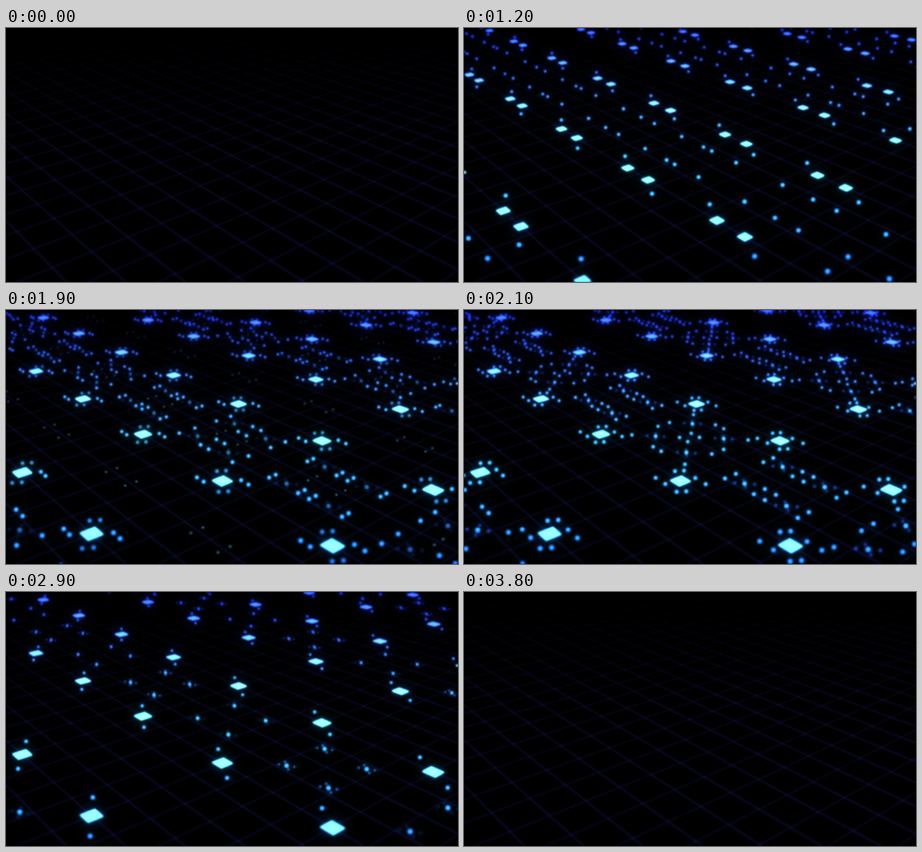
Write an HTML page with a canvas that moves like this. It is 690 by 388 pixels and loops after 5 s.

```html
<!DOCTYPE html>
<html lang="en">
<head>
<meta charset="utf-8">
<title>Perspective grid</title>
<style>
  html, body { margin: 0; width: 100%; height: 100%; overflow: hidden; background: #000; }
  canvas { display: block; width: 690px; height: 388px; }
</style>
</head>
<body>
<canvas id="stage" width="690" height="388"></canvas>
<script>
const W = 690, H = 388, LOOP = 5000, STEP = 100, STRIP = 24;
const ctx = document.getElementById('stage').getContext('2d');

function makeLayer() {
  const c = document.createElement('canvas');
  c.width = W;
  c.height = H;
  return c.getContext('2d');
}
const layer = makeLayer(), floor = makeLayer();

// Halo colour changes with distance: blue far away, teal in the middle.
const haze = layer.createLinearGradient(0, 0, 0, H);
haze.addColorStop(0, 'rgb(20,40,245)');
haze.addColorStop(0.2, 'rgb(15,75,245)');
haze.addColorStop(0.5, 'rgb(5,145,195)');
haze.addColorStop(1, 'rgb(10,110,235)');

const clamp = v => Math.max(0, Math.min(1, v));
const mix = (a, b, k) => a + (b - a) * k;

// Floor plane to screen; one unit is four grid cells.
function project(i, j) {
  const d = 1 - 0.139 * i + 0.1169 * j;
  return {
    x: (209.2 + 75.3 * i + 187.3 * j) / d,
    y: (189.7 + 35.1 * i - 29.45 * j) / d,
    w: 1 / d,
    d
  };
}

const visible = p => p.d > 0.2 && p.x > -50 && p.x < W + 50 && p.y > -20 && p.y < H + 40;

// Piecewise linear value from [time, value] pairs.
function key(t, ...k) {
  if (t <= k[0][0]) return k[0][1];
  for (let n = 1; n < k.length; n++) {
    const [t0, v0] = k[n - 1], [t1, v1] = k[n];
    if (t <= t1) return mix(v0, v1, (t - t0) / (t1 - t0));
  }
  return k[k.length - 1][1];
}

function shade(far, mid, near, y, alpha) {
  const up = clamp((y - 5) / 125), down = clamp((y - 220) / 160);
  const c = mid.map((m, n) => Math.round(y < 200 ? mix(far[n], m, up) : mix(m, near[n], down)));
  return `rgba(${c},${alpha})`;
}

function square(i, j, s, alpha = 1) {
  const p = project(i, j);
  if (s < 0.002 || alpha <= 0 || !visible(p)) return;
  const color = shade([55, 105, 255], [165, 255, 255], [140, 235, 255], p.y, alpha);
  layer.fillStyle = layer.strokeStyle = color;
  layer.lineWidth = Math.min(2.4, s * 75);
  layer.lineJoin = 'round';
  layer.beginPath();
  for (const [a, b] of [[-1, -1], [1, -1], [1, 1], [-1, 1]]) {
    const q = project(i + a * s, j + b * s);
    layer.lineTo(q.x, q.y);
  }
  layer.closePath();
  layer.fill();
  layer.stroke();
}

function dot(i, j, size = 1, alpha = 1, violet = false) {
  const p = project(i, j);
  if (alpha <= 0 || !visible(p)) return;
  layer.fillStyle = violet
    ? `rgba(45,50,225,${alpha})`
    : shade([30, 45, 215], [80, 165, 255], [45, 115, 255], p.y, alpha);
  layer.beginPath();
  layer.arc(p.x, p.y, Math.max(1.8, 2.5 * p.w) * size, 0, 7);
  layer.fill();
}

// Depth of field: each strip of the layer gets its own blur.
function focus(src, dst) {
  dst.globalCompositeOperation = 'lighter';
  for (let y = 0; y < H; y += STRIP) {
    const m = y + STRIP / 2, h = Math.min(STRIP, H - y);
    const blur = 0.8 + Math.max(0, (150 - m) / 150 * 0.5, (m - 230) / 150 * 0.7);
    dst.filter = `blur(${blur.toFixed(2)}px)`;
    dst.drawImage(src.canvas, 0, y, W, h, 0, y, W, h);
  }
  dst.filter = 'none';
}

function halo(blur, alpha) {
  ctx.globalAlpha = alpha;
  ctx.filter = `blur(${blur}px)`;
  ctx.drawImage(layer.canvas, 0, 0);
  ctx.filter = 'none';
  ctx.globalAlpha = 1;
}

function segment(i0, j0, i1, j1, width, strength) {
  const a = project(i0, j0), b = project(i1, j1);
  if (a.d < 0.2 || b.d < 0.2) return;
  const y = (a.y + b.y) / 2;
  if (y < -30 || y > H + 60) return;
  layer.strokeStyle = `rgba(28,28,130,${strength * mix(0.06, 1, clamp((y - 15) / 150))})`;
  layer.lineWidth = width * a.w;
  layer.beginPath();
  layer.moveTo(a.x, a.y);
  layer.lineTo(b.x, b.y);
  layer.stroke();
}

function buildFloor() {
  layer.globalCompositeOperation = 'lighter';
  for (let i = -7; i <= 6; i += 0.25) {
    for (let j = -4; j <= 9; j += 0.25) {
      segment(i, j, i + 0.25, j, 1.5, 0.42);
      segment(i, j, i, j + 0.25, 1.1, 0.34);
    }
  }
  layer.globalCompositeOperation = 'source-over';
  focus(layer, floor);
}

function drawNode(i, j, s) {
  for (const q of [-1, 1]) {
    dot(i + q * s.lead, j + q * 0.105, 1, s.trail);
    dot(i + q * s.lag, j + q * 0.103, 1, s.lagAlpha);
    dot(i + q * 0.135, j - q * 0.06, 1, s.swarm);
    dot(i + q * 0.1, j - q * 0.114, 1, s.swarm);
    square(i + q * s.spread, j + s.side, s.small);
    if (s.side) square(i + q * s.spread, j - s.side, s.small);
  }
  square(i, j, s.big, s.bigAlpha);
}

function drawCell(i, j, s) {
  const odd = Math.abs(i % 2) === 1;
  const shown = odd ? s.oddAlpha : s.evenAlpha;
  const ring = odd ? s.oddRing : s.evenRing;
  const lift = odd ? s.liftOdd : s.lift;
  for (const pi of [0.31, 0.69]) {
    const reach = !odd ? s.reach : pi < 0.5 ? s.reachLate : s.reachOdd;
    for (const pj of [0.31, 0.69]) {
      const ci = i + pi, cj = j + pj;
      for (const a of [-1, 1]) {
        for (const b of [-1, 1]) {
          dot(ci + a * reach, cj + b * lift, s.mote, shown * ring);
        }
        dot(ci + a * 0.05, cj + a * 0.045, 0.75, s.violet, true);
        dot(ci + a * 0.04, cj - a * 0.03, 0.65, s.violet, true);
      }
      dot(ci, cj, 1.1, s.core);
    }
  }
}

function stateAt(t) {
  const out = key(t, [3100, 1], [3700, 0]);
  const close = [[2100, 0.14], [2900, 0.045]];
  return {
    spread: key(t, [200, 0], [600, 0.131], [1200, 0.372]),
    side: key(t, [1200, 0], [1600, 0.321], [2000, 0.5]),
    small: key(t, [100, 0], [400, 0.032], [1600, 0.031], [1950, 0]),
    big: key(t, [1200, 0], [1550, 0.047], [3200, 0.047], [3800, 0]),
    bigAlpha: key(t, [3200, 1], [3800, 0]),
    lead: key(t, [700, 0.05], [1200, 0.185], [1600, 0.135], [2100, 0.034], [2800, -0.177]),
    lag: key(t, [700, 0.05], [1200, 0.185], [1600, 0.165], [2100, 0.145]),
    trail: key(t, [700, 0], [1000, 1]) * out,
    lagAlpha: key(t, [700, 0], [1000, 1], [2200, 1], [2700, 0]),
    swarm: key(t, [1700, 0], [2000, 1], [2200, 1], [2700, 0]),
    reach: key(t, [600, 0], [1200, 0.14], ...close),
    reachLate: key(t, [1200, 0], [1600, 0.14], ...close),
    reachOdd: key(t, [900, 0], [1200, 0.1], [1500, 0.14], ...close),
    lift: key(t, [1600, 0], [2100, 0.13], [2900, 0.028]),
    liftOdd: key(t, [1600, 0], [2100, 0.052], [2900, 0.028]),
    mote: key(t, [2100, 1], [2900, 0.6]),
    evenAlpha: key(t, [200, 0], [500, 1]) * out,
    oddAlpha: key(t, [700, 0], [1000, 1]) * out,
    evenRing: key(t, [2200, 1], [2900, 0.15]),
    oddRing: key(t, [2200, 1], [2900, 0.6]),
    violet: key(t, [1800, 0], [2100, 0.6], [2700, 0.15], [3100, 0]),
    core: key(t, [1700, 0], [2100, 1]) * out
  };
}

function draw(t) {
  ctx.globalCompositeOperation = 'source-over';
  ctx.fillStyle = '#000';
  ctx.fillRect(0, 0, W, H);
  ctx.drawImage(floor.canvas, 0, 0);
  if (t < 200 || t >= 3800) return;

  layer.clearRect(0, 0, W, H);
  const s = stateAt(t);
  for (let i = -7; i <= 5; i++) {
    for (let j = -4; j <= 8; j++) {
      if (j % 2 === 0) drawCell(i, j, s);
      drawNode(i, j, s);
    }
  }
  focus(layer, ctx);

  layer.globalCompositeOperation = 'source-in';
  layer.fillStyle = haze;
  layer.fillRect(0, 0, W, H);
  layer.globalCompositeOperation = 'source-over';
  halo(2, 0.75);
  halo(9, 0.5);
}

buildFloor();
const start = performance.now();
let last = -1;
function tick() {
  const t = Math.floor(((performance.now() - start) % LOOP) / STEP) * STEP;
  if (t !== last) draw(last = t);
  requestAnimationFrame(tick);
}
tick();
</script>
</body>
</html>
```
